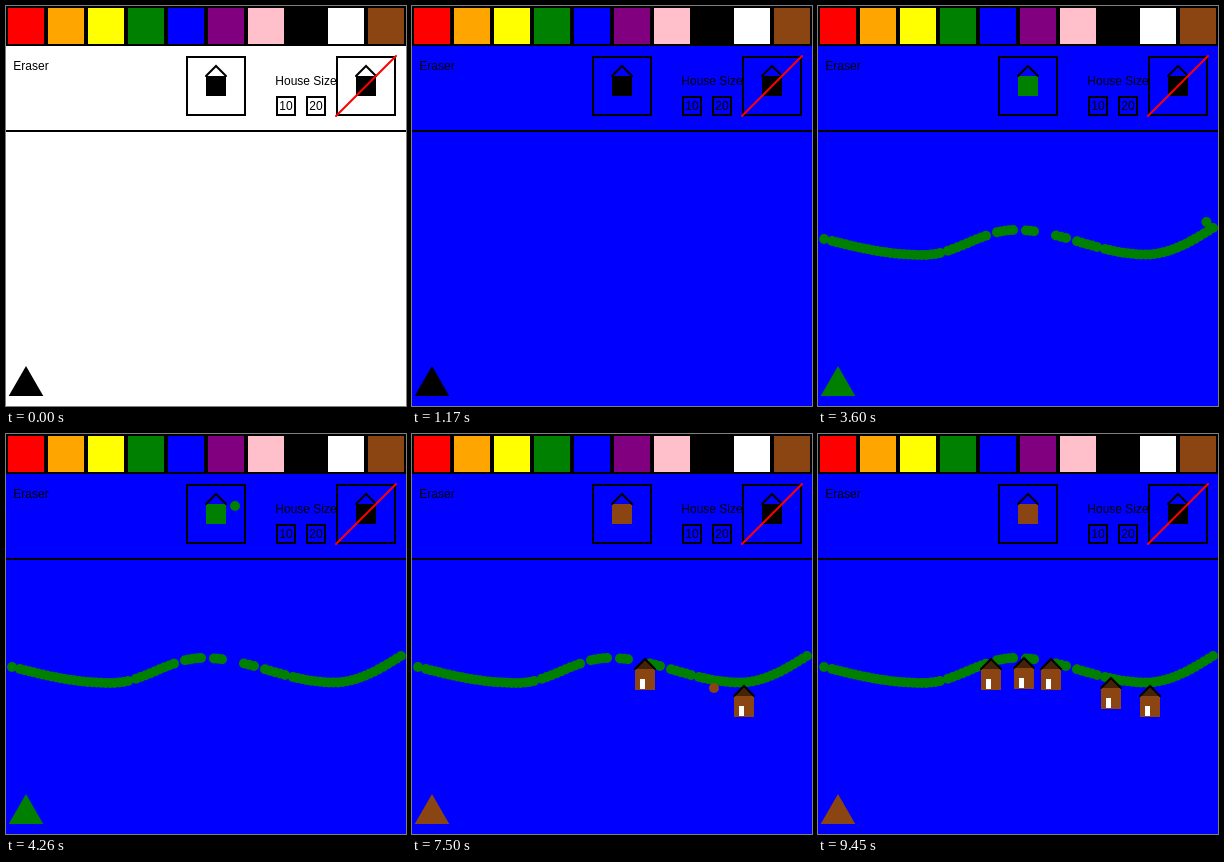
An HTML page with a canvas that plays this animation: 400 px wide and 400 px high, repeating every 9990 ms.

```html
<!DOCTYPE html>
<html>
<head>
<meta charset="utf-8">
<style>
html, body { margin: 0; width: 100%; height: 100%; overflow: hidden; }
canvas { display: block; width: 400px; height: 400px; }
</style>
</head>
<body>
<canvas id="stage" width="400" height="400"></canvas>
<script>
const LOOP = 9990, STEP = 30;
const FILL_AT = 150, GREEN_AT = 1470, BROWN_AT = 5400;
const DRAW_START = 2580, DRAW_END = 3120, DAB_GAP = 4.5;
const BUILD_AT = [6720, 7230, 7620, 8430, 8640];
const BROWN = '#8b4513', ROOF = '#45220a';
const SWATCHES = ['red', 'orange', 'yellow', 'green', 'blue', 'purple', 'pink', 'black', 'white', BROWN];
const ctx = document.getElementById('stage').getContext('2d');

// Pointer moves: start time, end time, destination
const MOVES = [
  [480, 1170, 140, 28],
  [1620, 2160, 6, 233],
  [DRAW_START, DRAW_END, 395, 222],
  [3510, 4260, 229, 72],
  [4260, 4380, 214, 80],
  [4890, 5010, 378, 28],
  [5610, 5970, 215, 150],
  [6240, 6420, 205, 184],
  [6420, 6660, 233, 245],
  [6900, 7080, 332, 272],
  [7290, 7500, 302, 254],
  [7500, 7530, 293, 264],
  [7830, 8190, 206, 244],
  [8460, 8580, 173, 245],
  [8970, 9150, 232, 34]
];

// Crests and troughs of the hills, and the stretches that got painted
const HILLS = [[-93, 217], [105, 249], [197, 224], [328, 248.5], [462, 195.5]];
const SPANS = [[6, 6], [14, 122], [130, 168], [179, 195], [208, 216], [238, 248], [259, 279], [287, 395]];

const mix = (a, b, k) => a + (b - a) * k;
const smooth = k => k * k * (3 - 2 * k);

function hillY(x) {
  const i = HILLS.findIndex(h => h[0] > x);
  const [x0, y0] = HILLS[i - 1], [x1, y1] = HILLS[i];
  return mix(y0, y1, (1 - Math.cos(Math.PI * (x - x0) / (x1 - x0))) / 2);
}

const dabs = SPANS.flatMap(([from, to]) => {
  const n = Math.round((to - from) / DAB_GAP);
  return Array.from({ length: n + 1 }, (_, i) => {
    const x = mix(from, to, i / Math.max(n, 1));
    return [x, hillY(x)];
  });
});

// The brush picks up a little speed along the way
function drawnDabs(t) {
  if (t < DRAW_START) return [];
  const k = Math.min(1, (t - DRAW_START) / (DRAW_END - DRAW_START));
  return dabs.slice(0, Math.max(1, Math.floor(dabs.length * k ** 1.1)));
}

function pointer(t) {
  if (t >= DRAW_START && t < DRAW_END) return drawnDabs(t).pop();
  let x = 20, y = 378;
  for (const [start, end, toX, toY] of MOVES) {
    if (t <= start) break;
    const k = smooth(Math.min(1, (t - start) / (end - start)));
    x = mix(x, toX, k);
    y = mix(y, toY, k);
  }
  return [x, y];
}

function dot(x, y, color) {
  ctx.fillStyle = color;
  ctx.beginPath();
  ctx.arc(x, y, 5, 0, Math.PI * 2);
  ctx.fill();
}

function rect(x, y, w, h, color) {
  ctx.fillStyle = color;
  ctx.fillRect(x, y, w, h);
}

function line(color, ...pts) {
  ctx.strokeStyle = color;
  ctx.beginPath();
  pts.forEach(([x, y]) => ctx.lineTo(x, y));
  ctx.stroke();
}

function frame(x, y, size) {
  ctx.strokeStyle = 'black';
  ctx.strokeRect(x + 1, y + 1, size - 2, size - 2);
}

function triangle(x, y, half, height, color) {
  ctx.fillStyle = color;
  ctx.beginPath();
  ctx.moveTo(x - half, y);
  ctx.lineTo(x, y - height);
  ctx.lineTo(x + half, y);
  ctx.fill();
}

function hut(x, y, color, height = 20) {
  rect(x - 10, y, 20, height, color);
  line('black', [x - 10, y], [x, y - 10], [x + 10, y]);
}

function house(x, y) {
  triangle(x, y - 10, 10, 10, ROOF);
  hut(x, y - 10, BROWN, 21);
  rect(x - 5, y, 5, 10, 'white');
}

function label(text, x, y) {
  ctx.fillStyle = 'black';
  ctx.fillText(text, x, y);
}

function toolbar(color) {
  SWATCHES.forEach((swatch, i) => {
    rect(i * 40, 0, 40, 40, 'black');
    rect(i * 40 + 2, 2, 36, 36, swatch);
  });
  frame(180, 50, 60);
  hut(210, 70, color);
  frame(330, 50, 60);
  hut(360, 70, 'black');
  line('red', [330, 110], [390, 50]);
  label('Eraser', 25, 61);
  label('House Size', 300, 76);
  [10, 20].forEach((size, i) => {
    frame(270 + i * 30, 90, 20);
    label(size, 280 + i * 30, 101);
  });
  rect(0, 124, 400, 2, 'black');
  triangle(20, 390, 17.3, 30, color);
}

function render(t) {
  const color = t < GREEN_AT ? 'black' : t < BROWN_AT ? 'green' : BROWN;
  rect(0, 0, 400, 400, t < FILL_AT ? 'white' : 'blue');
  drawnDabs(t).forEach(([x, y]) => dot(x, y, 'green'));
  dot(...pointer(t), color);
  BUILD_AT.filter(at => t >= at).forEach(at => house(...pointer(at)));
  toolbar(color);
}

ctx.font = '12px "Liberation Sans", Arial, sans-serif';
ctx.textAlign = 'center';
ctx.textBaseline = 'middle';
ctx.lineWidth = 2;
ctx.lineCap = 'round';

const start = performance.now();
function tick() {
  const t = (performance.now() - start) % LOOP;
  render(Math.floor(t / STEP) * STEP);
  requestAnimationFrame(tick);
}
tick();
</script>
</body>
</html>
```
